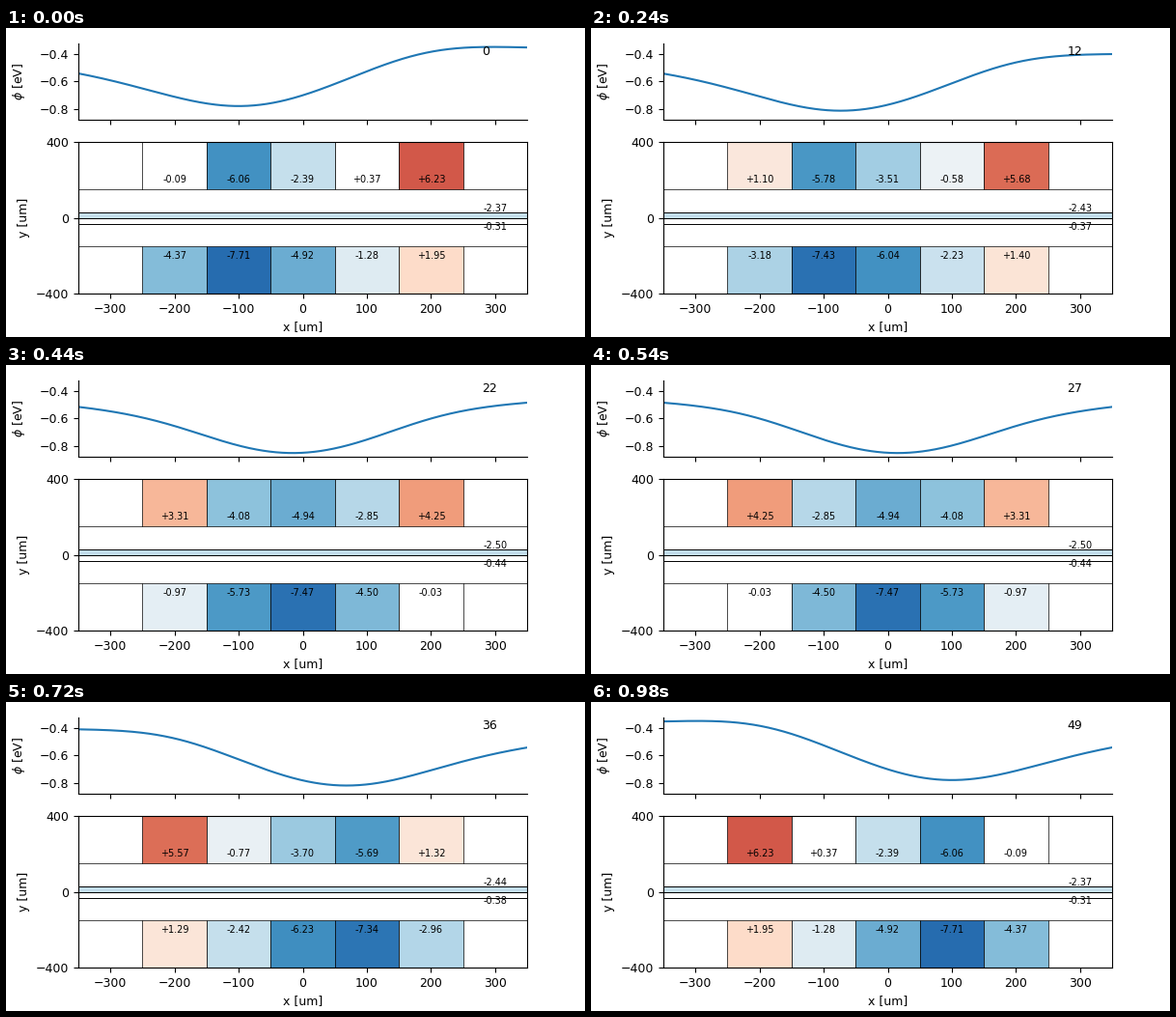
Write a matplotlib script that moves like this. It is 600 px wide and 320 px high and loops after 1000 ms.

```python
import matplotlib.pyplot as plt
import numpy as np
from matplotlib.animation import FuncAnimation
from matplotlib.patches import Rectangle

plt.rcParams.update({"font.family": "DejaVu Sans", "font.size": 9})

STEPS = 50
RAIL, SEGMENT = 30, 150             # inner electrode edges in um
HEIGHT = np.sqrt(RAIL * SEGMENT)    # ion height above the chip
CENTRES = np.arange(-200, 201, 100)
BOTTOM_SHIFT = np.array([-4.283, -1.647, -2.534, -1.647, -4.283])
RAIL_SHIFT = 2.056
POTENTIAL_OFFSET = 0.007

# Voltages at a few steps of the transport, smoothed in the cosine of time
KNOTS = np.array([0, 8, 16, 18, 22, 27, 31, 33, 41, 49])


def progress(step):
    return -np.cos(np.pi * step / (STEPS - 1))


def waveform(values):
    if len(values) < len(KNOTS):
        values = values + values[::-1]
    return np.poly1d(np.polyfit(progress(KNOTS), values, 7))


outer = waveform([-0.09, 0.38, 2.01, 2.47, 3.31, 4.25, 4.91, 5.19, 6.02, 6.23])
inner = waveform([-6.06, -5.99, -5.31, -4.96, -4.08,
                  -2.85, -1.87, -1.41, 0.003, 0.37])
middle = waveform([-2.39, -2.84, -4.26, -4.57, -4.94])
rail = waveform([-2.37, -2.39, -2.47, -2.48, -2.50])


def voltages(step):
    c = progress(step)
    top = np.array([outer(c), inner(c), middle(c), inner(-c), outer(-c)])
    return [*top, *(top + BOTTOM_SHIFT), rail(c), rail(c) + RAIL_SHIFT]


def edge_angle(u):
    r = np.sqrt(HEIGHT**2 + u**2 + SEGMENT**2)
    return np.arctan(u / HEIGHT) - np.arctan(u * SEGMENT / (HEIGHT * r))


def potential(x, volts):
    phi = (volts[10] + volts[11]) * np.arctan(RAIL / HEIGHT) / np.pi
    for centre, upper, lower in zip(CENTRES, volts[:5], volts[5:10]):
        d = centre - x
        solid = edge_angle(d + 50) - edge_angle(d - 50)
        phi = phi + (upper + lower) * solid / (2 * np.pi)
    return phi + POTENTIAL_OFFSET


def colour(volt):
    return "white" if abs(volt) < 0.5 else plt.cm.RdBu_r((volt + 10) / 20)


fig, (ax_phi, ax_trap) = plt.subplots(
    2, 1, sharex=True, figsize=(6, 3.2), dpi=100,
    gridspec_kw=dict(left=0.125, right=0.9, bottom=0.14, top=0.95,
                     hspace=0.2, height_ratios=[1, 2]))

x = np.linspace(-350, 350, 351)
curve, = ax_phi.plot(x, 0 * x, lw=1.5)
counter = ax_phi.text(0.9, 0.845, "", transform=ax_phi.transAxes)
ax_phi.spines[["top", "right"]].set_visible(False)
ax_phi.set_ylim(-0.874, -0.323)
ax_phi.set_yticks([-0.8, -0.6, -0.4])
ax_phi.set_ylabel(r"$\phi$ [eV]", labelpad=9.5)

ax_trap.set(xlim=(-350, 350), ylim=(-400, 400), yticks=[-400, 0, 400],
            xlabel="x [um]", ylabel="y [um]")
ax_trap.set_xticks(range(-300, 301, 100))

cells, labels = [], []


def add_electrode(x0, y0, width, height, text_x, text_y, lw):
    cells.append(ax_trap.add_patch(
        Rectangle((x0, y0), width, height, ec="black", lw=lw)))
    labels.append(ax_trap.text(text_x, text_y, "", fontsize=7,
                               ha="center", va="center"))


for y0, text_y in ((SEGMENT, 200), (-1000, -200)):
    for centre in CENTRES:
        add_electrode(centre - 50, y0, 100, 1000 - SEGMENT, centre, text_y, 0.5)
for y0, text_y in ((0, 50), (-RAIL, -50)):
    add_electrode(-1000, y0, 2000, RAIL, 300, text_y, 0.7)
for y in (-SEGMENT, SEGMENT):
    for side in (-1, 1):
        ax_trap.plot([side * 250, side * 400], [y, y], color="black", lw=0.5)


def update(step):
    volts = voltages(step)
    curve.set_ydata(potential(x, volts))
    counter.set_text(str(step))
    for cell, label, volt in zip(cells, labels, volts):
        cell.set_facecolor(colour(volt))
        label.set_text(f"{volt:+.2f}")
    return [curve, counter, *cells, *labels]


anim = FuncAnimation(fig, update, frames=STEPS, interval=20,
                     repeat=True, repeat_delay=0)
plt.show()
```
